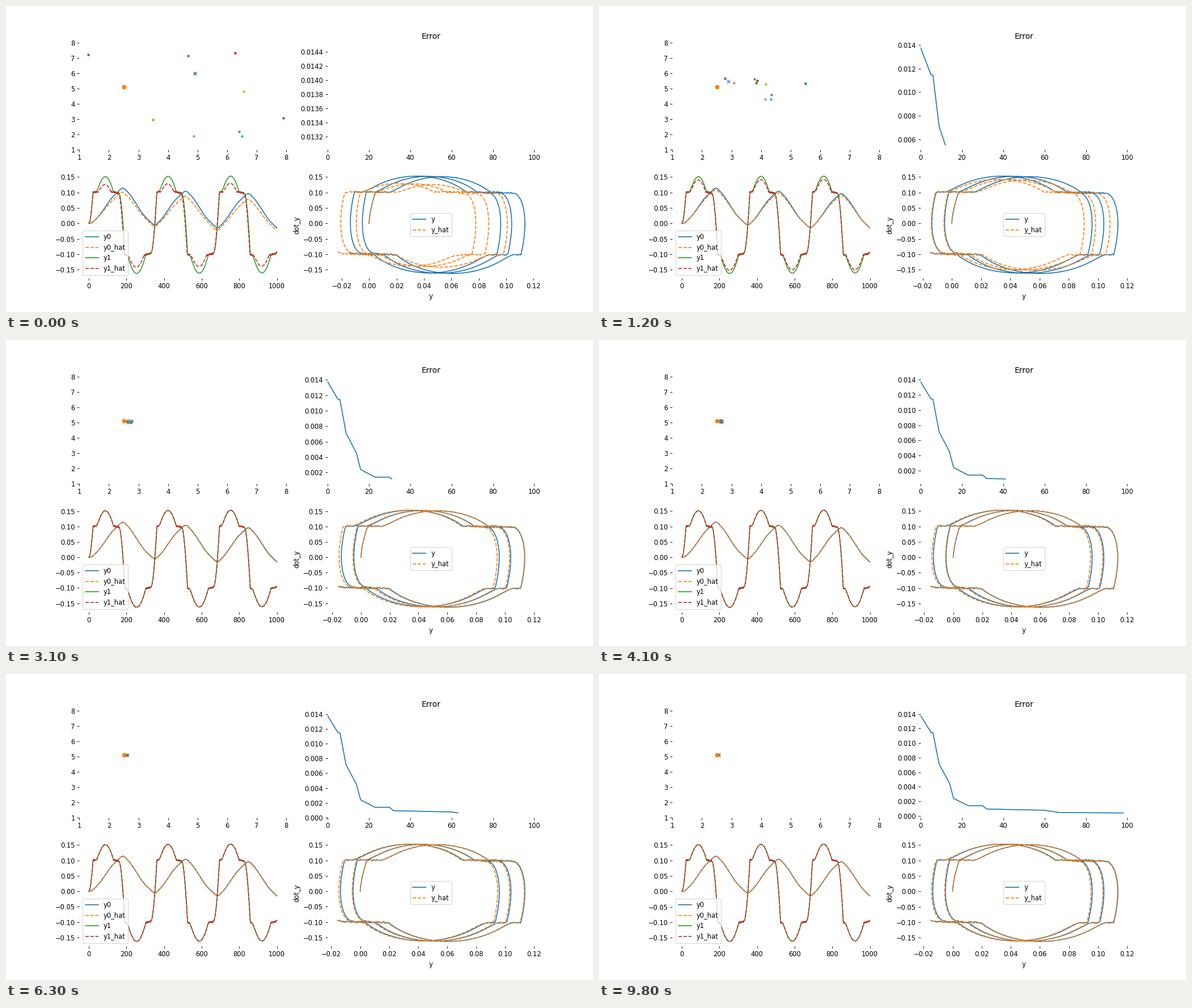
A matplotlib script that plays this animation: 1035x541 px, repeating every 9900 ms.

```python
import numpy as np
import matplotlib.pyplot as plt
from matplotlib.animation import FuncAnimation

FRAMES, STEPS, SUBSTEPS = 99, 1000, 3
DT = 6 / (STEPS - 1) / SUBSTEPS
TRUE = np.array([2.504, 5.1])  # stiffness, damping
MAX_STEP = 0.2  # fastest particle move per frame and coordinate


def simulate(stiffness, damping):
    """Driven oscillator whose damping is ten times stronger above |v| = 0.1."""
    y = np.zeros(np.shape(stiffness))
    v = np.zeros_like(y)
    path = np.empty((STEPS, 2) + y.shape)
    for i in range(STEPS * SUBSTEPS):
        if i % SUBSTEPS == 0:
            path[i // SUBSTEPS] = y, v
        drag = np.where(np.abs(v) > 0.1, 5, 0.5) * damping * v
        accel = 4 * np.sin(np.pi * i * DT) - stiffness * y - drag
        y, v = y + v * DT, v + accel * DT
    return path


def chase(starts, leader):
    """Particles move at limited speed towards shrinking orbits round the leader."""
    phase = np.random.default_rng(4).uniform(0, 2 * np.pi, len(starts))
    track = [np.array(starts)]
    for n in range(1, FRAMES):
        angle = phase + 0.5 * n
        orbit = 0.4 * np.exp(-n / 20) * np.column_stack([np.cos(angle), np.sin(angle)])
        move = leader[:, n] + orbit - track[-1]
        track.append(track[-1] + np.clip(move, -MAX_STEP, MAX_STEP))
    return np.array(track)


# Iteration, then stiffness, damping and error of the best guess
MILESTONES = np.array([
    (0, 4.91, 6.0, 0.01377), (5, 5.45, 5.6, 0.0115), (6, 2.49, 6.03, 0.01144),
    (9, 2.8, 5.62, 0.0071), (14, 2.95, 5.38, 0.0045), (16, 2.97, 5.12, 0.0024),
    (23, 2.74, 5.07, 0.0014), (30, 2.74, 5.07, 0.0014), (32, 2.66, 5.09, 0.00094),
    (60, 2.63, 5.1, 0.00077), (67, 2.58, 5.1, 0.00046), (98, 2.57, 5.1, 0.0004)])
iteration = np.arange(FRAMES)
*best, error = [np.interp(iteration, MILESTONES[:, 0], column)
                for column in MILESTONES.T[1:]]
best = np.array(best)

STARTS = [(7.9, 3.08), (3.49, 2.97), (4.68, 7.15), (6.27, 7.33), (6.41, 2.21),
          (1.3, 7.22), (4.87, 1.91), (4.91, 6.0), (6.56, 4.83), (6.51, 1.91)]
swarm = chase(STARTS, best)
truth = simulate(*TRUE)
estimate = simulate(*best)

plt.rcParams["font.size"] = 10.35
fig, ((ax_swarm, ax_error), (ax_time, ax_phase)) = plt.subplots(
    2, 2, figsize=(1035 / 80, 541 / 80), dpi=80)
for ax in fig.axes:
    for spine in ax.spines.values():
        spine.set_visible(False)

dots = [ax_swarm.plot([], [], ".")[0] for _ in STARTS]
best_mark, = ax_swarm.plot([], [], "x", color="C0")
ax_swarm.plot(*TRUE, "o", color="C1")
ax_swarm.set(xlim=(1, 8), ylim=(1, 8), xticks=range(1, 9), yticks=range(1, 9))

error_line, = ax_error.plot([], [])
ax_error.set_title("Error")
ax_error.set_xlim(0, 100)

hat_lines = []
for d in range(2):
    ax_time.plot(truth[:, d], label=f"y{d}")
    hat_lines += ax_time.plot(truth[:, d], "--", label=f"y{d}_hat")
ax_time.legend(loc="lower left")

ax_phase.plot(truth[:, 0], truth[:, 1], label="y")
phase_hat, = ax_phase.plot([], [], "--", label="y_hat")
ax_phase.set(xlabel="y", ylabel="dot_y")
ax_phase.legend(loc="center")


def update(n):
    for dot, (x, y) in zip(dots, swarm[n]):
        dot.set_data([x], [y])
    best_mark.set_data(best[:1, n], best[1:, n])
    error_line.set_data(iteration[:n + 1], error[:n + 1])
    for d, line in enumerate(hat_lines):
        line.set_ydata(estimate[:, d, n])
    phase_hat.set_data(estimate[:, 0, n], estimate[:, 1, n])
    for ax in (ax_error, ax_time, ax_phase):
        ax.relim()
        ax.autoscale_view()


anim = FuncAnimation(fig, update, frames=FRAMES, interval=100, repeat=True,
                     init_func=lambda: update(0), cache_frame_data=False)
plt.show()
```
